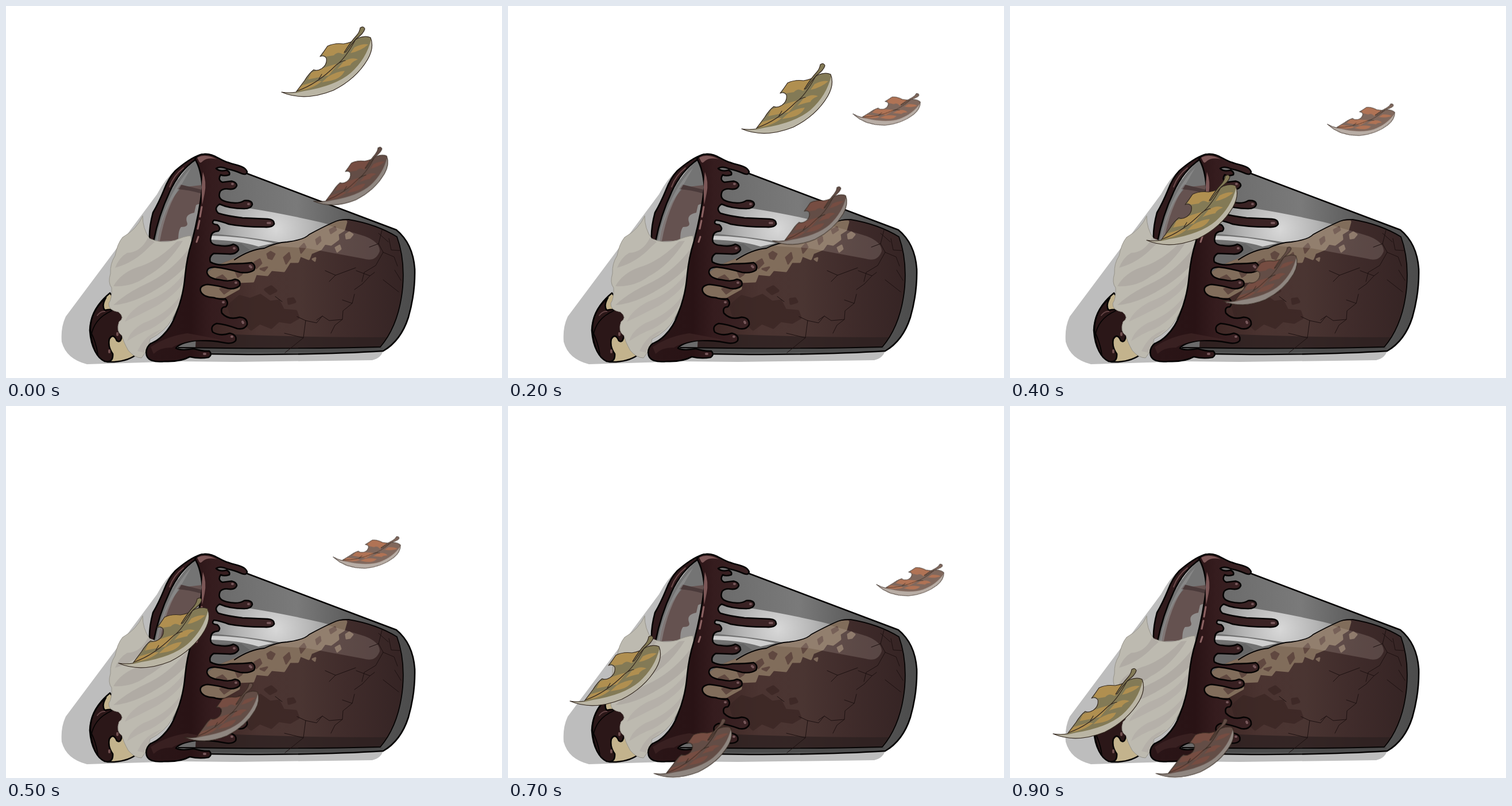
Recreate the animation shown at these times as an HTML page. Size 864 by 648 pixels, loop 1 s.

```html
<!DOCTYPE html>
<html lang="en">
<head>
<meta charset="utf-8">
<title>Spilled dessert cup with falling leaves</title>
<style>
html, body { margin: 0; width: 100%; height: 100%; overflow: hidden; background: #fff; }
svg { display: block; width: 100vw; height: 100vh; }
path { stroke-linejoin: round; stroke-linecap: round; }
.ink { stroke: #050303; stroke-width: 2.6; }
.line { fill: none; stroke: #050303; stroke-width: 1.8; }
/* Every leaf is placed by its pointed tip. */
.leaf { animation: 1s step-end infinite; }
.gold { --base: #837a56; --patch: #b08f50; --pale: #bab5a4; animation-name: gold; }
.brown { --base: #634d46; --patch: #764d42; --pale: #8f8680; animation-name: brown; }
.red { --base: #80685d; --patch: #b07355; --pale: #b8ada5; animation-name: red; }
.brown use { transform: scale(.82, .83); }
.red use { transform: rotate(21.5deg) scale(.655); }
@keyframes gold {
  0% { transform: translate(480px, 150px); }
  10% { transform: translate(444px, 182px); }
  20% { transform: translate(407px, 214px); }
  30% { transform: translate(270px, 360px); }
  40% { transform: translate(238px, 408px); }
  50% { transform: translate(196px, 448px); }
  60% { transform: translate(138px, 485px); }
  70% { transform: translate(108px, 514px); }
  80% { transform: translate(91px, 543px); }
  90%, 100% { transform: translate(75px, 571px); }
}
@keyframes brown {
  0% { transform: translate(536px, 340px); }
  10% { transform: translate(499px, 374px); }
  20% { transform: translate(461px, 409px); }
  30% { transform: translate(412px, 469px); }
  40% { transform: translate(371px, 514px); }
  50% { transform: translate(311px, 577px); }
  60% { transform: translate(270px, 631px); }
  70%, 100% { transform: translate(254px, 640px) scale(1.05, 1.01); }
}
@keyframes red {
  0% { transform: translate(601px, 188px); visibility: hidden; }
  20% { transform: translate(601px, 188px); visibility: visible; }
  30% { transform: translate(537px, 230px); visibility: visible; }
  40% { transform: translate(553px, 206px); visibility: visible; }
  50% { transform: translate(570px, 263px); visibility: visible; }
  60% { transform: translate(618px, 278px); visibility: visible; }
  70% { transform: translate(642px, 311px); visibility: visible; }
  80%, 100% { transform: translate(642px, 311px); visibility: hidden; }
}
</style>
</head>
<body>
<svg viewBox="0 0 864 648">
  <defs>
    <linearGradient id="glass" gradientUnits="userSpaceOnUse" x1="370" y1="0" x2="710" y2="0">
      <stop offset="0" stop-color="#6b6b6b"/><stop offset=".4" stop-color="#7a7a7a"/>
      <stop offset=".75" stop-color="#555"/><stop offset="1" stop-color="#4c4c4c"/>
    </linearGradient>
    <radialGradient id="shine" gradientUnits="userSpaceOnUse" cx="470" cy="388" r="125">
      <stop offset="0" stop-color="#d8d8d8"/><stop offset=".5" stop-color="#b5b5b5"/>
      <stop offset="1" stop-color="#858585"/>
    </radialGradient>
    <linearGradient id="cake" gradientUnits="userSpaceOnUse" x1="330" y1="0" x2="695" y2="0">
      <stop offset="0" stop-color="#38211f"/><stop offset=".3" stop-color="#4b3431"/>
      <stop offset=".5" stop-color="#4a3532"/><stop offset=".72" stop-color="#402c2b"/>
      <stop offset="1" stop-color="#352424"/>
    </linearGradient>
    <linearGradient id="sauce" gradientUnits="userSpaceOnUse" x1="250" y1="0" x2="430" y2="0">
      <stop offset="0" stop-color="#2a1517"/><stop offset=".4" stop-color="#291315"/>
      <stop offset=".6" stop-color="#351c1e"/><stop offset="1" stop-color="#3b2425"/>
    </linearGradient>
    <path id="cakeShape" d="M330 598 L336 480 Q350 456 400 439 Q425 424 450 422 Q470 412 490 411 Q520 407 528 398 Q550 386 570 377 Q582 371 597 372 Q645 380 681 402 Q695 440 691 490 Q685 555 652 594Z"/>
    <clipPath id="cakeClip"><use href="#cakeShape"/></clipPath>
    <path id="blade" d="M0 0 Q14 2 25 0 L40 -20 Q48 -33 56 -39 Q62 -36 70 -41 Q80 -48 78 -59 Q74 -65 67 -62 Q74 -71 80 -80 Q92 -86 108 -84 Q122 -86 133 -94 Q146 -99 155 -95 Q162 -78 150 -57 Q130 -23 90 -3 Q40 17 0 0Z"/>
    <g id="leaf">
      <use href="#blade" fill="var(--base)"/>
      <path fill="var(--patch)" d="M80 -80 Q92 -86 108 -84 L126 -88 Q116 -72 107 -66 Q98 -72 91 -64 L78 -62 L71 -65Z M60 -37 Q82 -46 99 -50 L82 -29 Q66 -26 46 -22 L52 -34Z M108 -53 Q122 -62 133 -57 Q121 -52 120 -47 Q105 -44 97 -40Z M36 -12 L60 -19 L70 -19 Q54 -5 27 -2Z M127 -78 Q142 -85 151 -83 Q139 -72 120 -68Z M81 -27 Q96 -36 110 -37 Q104 -24 86 -20 L70 -17Z"/>
      <path fill="var(--pale)" d="M0 0 Q20 4 40 -2 Q94 -11 120 -33 Q148 -58 156 -92 Q161 -77 150 -57 Q130 -23 90 -3 Q40 17 0 0Z"/>
      <g fill="none" stroke="#332820" stroke-width="1.2">
        <use href="#blade"/>
        <path d="M128 -90 Q110 -57 95 -47 Q62 -14 27 -2 M96 -48 Q104 -54 111 -55 M65 -23 L70 -31"/>
        <path fill="var(--base)" d="M137 -112 Q143 -116 145 -110 Q143 -102 130 -93 Q121 -83 112 -70 L109 -69 Q120 -87 131 -99 Q136 -105 137 -112Z"/>
      </g>
    </g>
  </defs>

  <path fill="#bdbdbd" d="M294 287 Q278 300 263 328 L104 541 Q95 560 97 585 Q105 615 141 624 L300 619 L400 620 L638 617 Q654 613 657 600 L400 560Z"/>

  <!-- Glass and cake -->
  <path fill="url(#glass)" d="M345 260 L420 291 L680 390 Q709 414 712 458 Q713 500 701 542 Q688 583 657 601 Q560 607 420 607 Q340 606 280 600Z"/>
  <path fill="url(#shine)" d="M360 345 Q430 350 545 376 L600 390 L560 428 L350 428Z"/>
  <path fill="#727272" d="M350 396 Q400 399 480 412 L430 428 L340 460Z"/>
  <path fill="#cfcfcf" d="M356 400 Q410 401 466 413 L440 419 Q405 408 356 407Z"/>
  <path fill="#666" d="M350 414 L410 414 L425 425 L350 462Z"/>
  <use href="#cakeShape" fill="url(#cake)"/>
  <g clip-path="url(#cakeClip)">
    <g stroke-width="5">
      <path fill="#816d5b" stroke="#816d5b" d="M330 500 L350 458 L400 440 L450 420 L520 405 L570 377 L592 376 L588 390 L577 397 L578 406 L566 415 L555 413 L548 423 L531 430 L527 440 L512 434 L508 445 L494 445 L484 461 L462 459 L455 468 L435 466 L430 479 L405 480 L405 492 L380 506 L355 506Z"/>
      <path fill="#604840" stroke="#604840" stroke-width="3" d="M367 474 l10 -5 7 7 -6 5z M400 463 l16 -4 -6 9 -6 4z M432 447 l10 -6 3 7 -9 9z M455 432 l6 -4 7 4 -5 9 -6 -2z M484 438 l9 -8 2 9 -7 10z M512 421 l7 -7 3 6 -8 10z M540 407 l7 -5 1 7 -6 6z M564 390 l9 -5 2 5 -9 6z M373 493 l14 -5 6 4 -13 9z M443 458 l12 -3 -5 6z"/>
      <path fill="#7d6859" stroke="#7d6859" stroke-width="3" d="M592 398 l6 -4 6 4 -5 6 -6 1z M574 421 l7 -4 2 6 -6 5z M534 441 l5 -2 -1 5z"/>
    </g>
    <path fill="#3b2725" stroke="#3b2725" stroke-width="5" opacity=".8" d="M388 522 l19 -16 18 5 18 -7 17 12 15 -2 8 16 22 2 4 11 -14 8 -20 -3 -13 12 -20 -8 -15 11 -15 -14 -18 -5z M452 494 l10 -5 8 7 -10 5z M492 511 l8 -1 3 5 -10 3z"/>
    <path fill="#2c2020" d="M330 569 Q480 577 670 577 L650 600 L300 600Z" opacity=".7"/>
    <path fill="#d9c9c1" opacity=".19" d="M430 350 Q550 377 625 401 Q651 411 651 427 Q644 447 622 440 L525 422 L450 417 L395 382Z"/>
  </g>
  <path fill="#4c4c4c" d="M300 594 Q500 598 656 594 L657 601 Q540 606 350 604Z"/>
  <path class="line" d="M398 442 Q425 424 450 422 Q470 412 490 411 Q520 407 528 398 Q550 386 570 377 Q582 371 597 372"/>
  <path class="line" stroke-width="1.4" d="M597 372 Q645 380 681 402 Q695 440 691 490 Q685 555 652 594 Q500 598 300 595"/>
  <path fill="none" stroke="#1d1111" d="M655 390 L649 414 L657 429 L644 452 L624 464 L620 480 M657 429 L676 437 L682 453 M649 414 L633 420 M667 405 L671 425 L687 426 M649 396 L666 411 M556 461 L574 469 L609 456 M574 469 L563 480 M610 461 L634 470 L642 464 M634 470 L621 484 L607 494 M586 512 L603 518 L607 502 M603 518 L587 531 L586 546 L563 548 L551 540 L541 547 M586 546 L573 556 L566 570 M522 548 L518 578 L486 604 M522 548 L541 552 L551 540 M522 548 L507 541 M469 506 L481 515 M657 477 L684 498 M677 460 L688 478 M485 570 L518 578"/>
  <path fill="none" class="ink" d="M415 290 L680 390 Q709 414 712 458 Q713 500 701 542 Q688 583 657 601 Q560 607 420 607 L350 606"/>

  <!-- Opening -->
  <path fill="#747474" d="M331 268 Q282 305 256 409 L325 406 Q343 350 341 300Z"/>
  <path fill="#655250" d="M340 312 L306 316 Q294 328 286 342 Q268 376 264 410 L325 408 Q340 350 340 312Z"/>
  <path fill="#4a3a3a" d="M304 311 L341 320 L341 327 Q318 320 298 319Z"/>
  <path fill="#918f8e" d="M331 347 Q340 341 337 352 L326 407 L300 409 Q300 390 305 385 Q319 385 315 376 Q311 363 328 360Z"/>
  <path fill="#999" d="M323 281 Q285 320 266 387 L261 409 L268 409 Q279 350 304 314Z" opacity=".5"/>
  <path class="ink" fill="#301a1c" d="M345 258 Q326 260 295 287 Q283 300 275 321 Q266 343 256 360 Q249 386 250 408 L257 410 Q266 364 285 324 Q302 287 331 267Z"/>
  <path fill="none" stroke="#6c4b4b" stroke-width="2" d="M309 282 Q292 295 285 315"/>

  <!-- Dipped biscuits -->
  <path class="ink" fill="#c3b38d" d="M181 500 Q147 528 146 565 Q149 610 177 620 Q208 621 226 608 L205 530Z"/>
  <path class="ink" fill="#2b1718" d="M174 508 Q146 532 147 566 Q151 610 172 619 Q187 622 186 606 Q177 594 180 580 Q187 569 193 583 Q200 588 202 574 L199 552 Q207 544 200 535 Q188 526 172 530 Q166 522 174 508Z"/>
  <path class="line" d="M148 577 Q152 545 184 531 M147 566 Q157 586 160 607"/>
  <path fill="none" stroke="#704f4f" stroke-width="4" d="M180 600 v3 M194 570 v3"/>
  <path fill="none" stroke="#624344" stroke-width="2" d="M159 539 Q165 531 172 532"/>

  <!-- Cream -->
  <path fill="#bdbab0" stroke="#96938a" d="M238 366 Q238 388 250 405 Q270 415 295 408 Q310 401 322 400 Q327 419 316 455 Q312 507 289 546 Q278 566 251 580 Q247 600 236 613 Q224 613 213 600 Q204 584 202 574 Q191 567 197 550 Q208 543 196 533 Q178 530 179 518 Q185 509 184 491 Q177 482 182 466 Q181 449 190 435 Q194 414 203 403 Q228 389 238 366Z"/>
  <g fill="#aca7a1" opacity=".75">
    <path d="M247 404 Q235 429 211 430 Q197 438 190 456 Q224 447 250 419 L259 411Z M298 410 Q264 445 229 455 Q200 465 187 488 Q220 490 245 471 Q281 452 308 409Z M318 423 Q286 465 244 484 Q208 501 187 521 Q216 519 249 501 Q292 478 317 449Z"/>
    <path d="M313 462 Q287 499 244 515 Q215 530 207 550 Q237 536 263 522 Q301 499 312 476Z M306 501 Q284 535 240 552 Q216 565 211 584 Q231 570 253 562 Q287 543 303 514Z M272 563 Q243 571 229 601 L240 604 L251 579Z" opacity=".65"/>
  </g>

  <!-- Chocolate rim with drips -->
  <path class="ink" fill="url(#sauce)" d="M329 266 Q335 258 345 258 C360 257 368 265 380 270 C398 278 416 277 420 289 Q419 295 411 292 Q397 286 386 284 Q372 278 366 283 Q372 289 384 286 Q391 289 389 294 Q380 297 374 294 Q368 303 377 307 L393 305 Q402 307 402 313 Q399 320 389 319 Q378 317 373 323 Q367 337 384 341 Q404 346 415 339 Q429 338 429 346 Q427 353 415 353 Q389 353 372 345 Q361 353 370 361 Q386 366 412 369 L456 371 Q468 372 467 380 Q464 386 450 385 Q413 385 388 380 Q372 374 362 373 Q356 380 368 381 Q375 387 370 392 Q357 393 357 402 Q353 416 370 417 Q386 420 396 415 Q406 418 405 425 Q400 433 388 432 L362 431 Q353 436 356 446 Q370 454 391 449 Q415 449 428 447 Q436 452 432 460 Q424 466 408 464 Q383 457 365 455 Q350 454 350 464 Q352 475 373 477 Q388 481 399 476 Q410 478 407 487 Q400 494 387 492 Q370 487 351 485 Q336 487 339 497 Q343 507 362 508 Q375 512 382 510 Q389 517 383 524 Q373 524 376 535 Q388 548 407 542 Q421 543 420 555 Q416 564 403 562 Q381 554 367 553 Q355 557 360 568 Q373 576 390 570 Q403 573 400 583 Q394 590 377 586 Q355 582 329 583 Q302 587 296 596 Q305 601 327 597 Q343 602 354 601 Q360 607 353 612 Q337 615 320 611 Q304 620 277 619 Q250 622 245 609 Q242 596 252 588 Q263 584 273 574 Q289 558 296 537 Q309 506 312 470 Q315 438 324 410 Q337 360 342 316 Q340 284 329 266Z"/>
  <path fill="#7c5757" d="M333 264 Q348 256 367 267 Q352 263 343 270 Q338 276 336 270Z M343 289 Q350 307 346 326 L342 346 Q339 321 343 289Z"/>
  <path fill="none" stroke="#8d6464" stroke-width="3" d="M341 350 L338 367 M337 374 L334 388 M335 402 L332 411"/>
  <path fill="none" stroke="#76575a" stroke-width="4" d="M394 310 h1 M422 345 h1 M456 378 h4 M397 422 h1 M425 453 l2 2 M400 482 h1 M378 516 h1 M412 550 l1 2 M393 576 h1 M345 606 h2"/>
  <path fill="#442829" opacity=".6" d="M252 594 Q280 575 316 570 Q370 580 380 583 Q317 578 289 595 Q269 594 257 606Z"/>

  <g class="leaf brown"><use href="#leaf"/></g>
  <g class="leaf gold"><use href="#leaf"/></g>
  <g class="leaf red"><use href="#leaf"/></g>
</svg>
</body>
</html>
```
